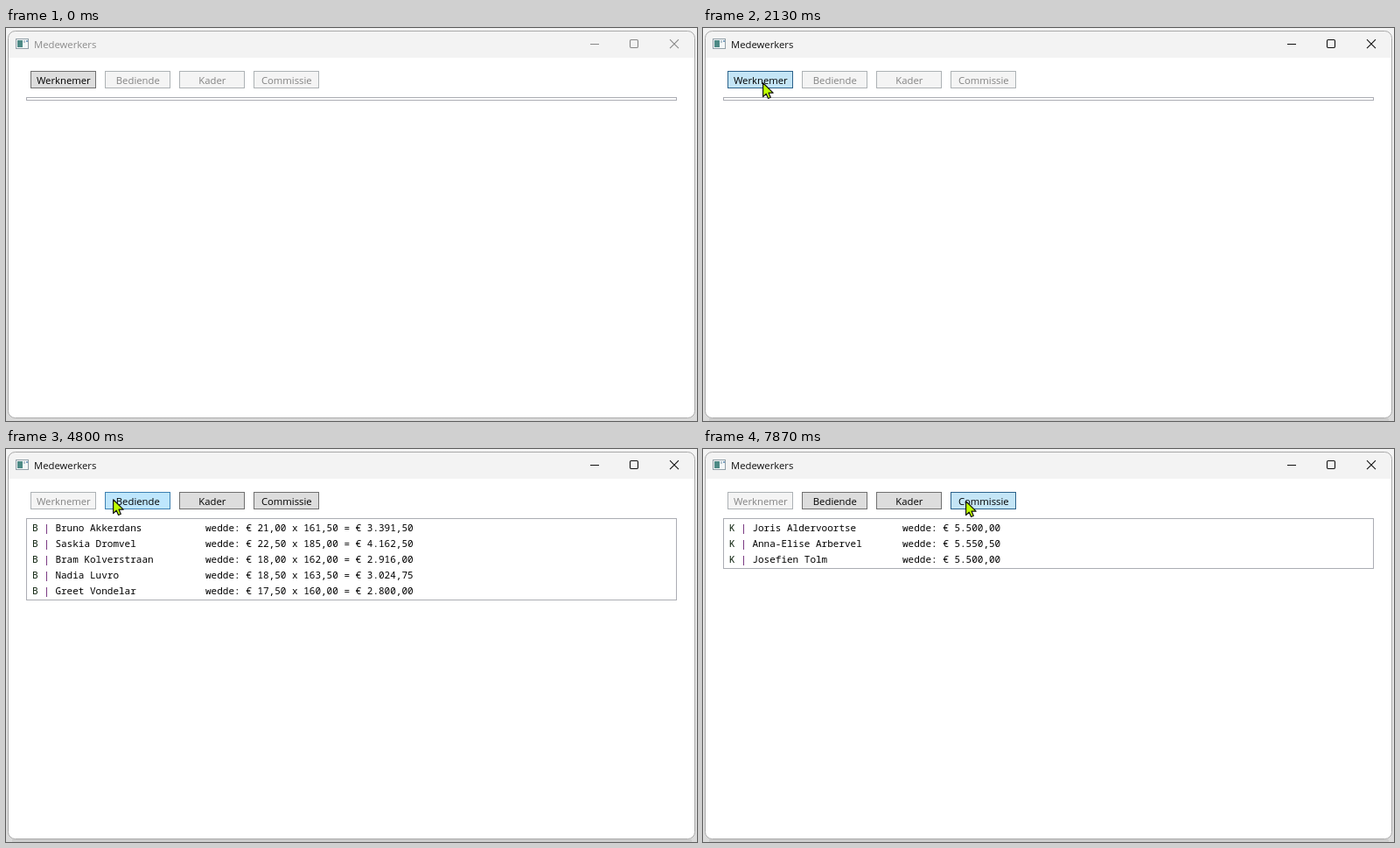
Recreate the animation shown at these times as an HTML page. Size 790 by 449 pixels, loop 8 s.

```html
<!DOCTYPE html>
<html lang="nl">
<head>
<meta charset="utf-8">
<title>Medewerkers</title>
<style>
  html, body { margin: 0; width: 100%; height: 100%; overflow: hidden; background: #fff; }
  svg { display: block; width: 790px; height: 449px; }
  text { font: 11.3px "Open Sans", "Noto Sans", sans-serif; white-space: pre; }
  .list text { font: 11px "Noto Sans Mono", "Liberation Mono", monospace; }
</style>
</head>
<body>
<svg id="stage" viewBox="0 0 790 449">
  <defs>
    <linearGradient id="backdrop" x2="0" y2="1">
      <stop stop-color="#f4f4f4"/>
      <stop offset=".5" stop-color="#e6e6e6"/>
      <stop offset="1" stop-color="#dadada"/>
    </linearGradient>
  </defs>
  <rect width="790" height="449" fill="url(#backdrop)"/>
  <rect id="shadow" x="7" y="446" width="777" height="3" fill="#000" opacity="0"/>
  <rect x="2.5" y="3.5" width="785" height="442" rx="8" fill="#fff"/>
  <path d="M3 34V11a8 8 0 0 1 8-8H779a8 8 0 0 1 8 8V34z" fill="#f3f3f3"/>
  <rect x="2.5" y="3.5" width="785" height="442" rx="8" fill="none" stroke="#a9a9a9"/>
  <g>
    <rect x="11.5" y="12.5" width="14" height="11" fill="#f4f7f8" stroke="#92a0a8"/>
    <rect x="13" y="14" width="6" height="8" fill="#4d8a86"/>
    <rect x="20" y="14" width="2" height="3" fill="#b9c8d0"/>
    <rect x="23" y="14" width="2" height="2" fill="#7fa3c4"/>
  </g>
  <text id="title" x="32" y="23">Medewerkers</text>
  <g id="controls" fill="none" stroke-width="1.1">
    <path d="M668 18.5h10M759 13.2l10 10m0-10l-10 10"/>
    <rect x="713.5" y="13.5" width="9" height="9" rx="1.2"/>
  </g>
  <g id="lists"></g>
  <g id="buttons"></g>
  <path id="cursor" d="M.6.8V16.6L4.2 13.2 6.6 18.5 9.3 17.3 7 12.1H12.2Z"
        fill="#bfff00" stroke="#111" stroke-width="1.2" stroke-linejoin="round"/>
</svg>
<script>
const TICKS = 120, DURATION = 8000;
const $ = id => document.getElementById(id);

function add(parent, tag, attrs, text = '') {
  const el = document.createElementNS('http://www.w3.org/2000/svg', tag);
  for (const key in attrs) el.setAttribute(key, attrs[key]);
  el.textContent = text;
  return parent.appendChild(el);
}

// Loops hard steps; propsAt(tick) gives the style at each 1/15 s tick.
function play(el, propsAt) {
  const frames = [];
  let previous = '';
  for (let tick = 0; tick < TICKS; tick++) {
    const props = propsAt(tick), key = JSON.stringify(props);
    if (key !== previous) {
      const offset = Math.round(tick / 15 * 100) * 10 / DURATION;
      frames.push({ ...props, offset, easing: 'step-end' });
    }
    previous = key;
  }
  frames.push({ ...frames[frames.length - 1], offset: 1 });
  el.animate(frames, { duration: DURATION, iterations: Infinity });
}

// Pointer
const easeOut = power => u => 1 - (1 - u) ** power;
const smooth = u => u * u * (3 - 2 * u);
const moves = [
  // start tick, end tick, end point, easing
  [10, 11, [684, 435], easeOut(1)],
  [11, 22, [80, 75], easeOut(2)],
  [22, 23, [75, 67], easeOut(1)],
  [23, 25, [68, 62], easeOut(1.2)],
  [44, 55, [120, 57], easeOut(1.1)],
  [71, 83, [222, 57], smooth],
  [102, 111, [300, 59], easeOut(1.2)]
];

function pointerAt(tick) {
  let point = [684, 470];
  if (tick < 11) return point;
  for (const [start, end, target, ease] of moves) {
    if (tick <= start) break;
    const p = ease(Math.min(1, (tick - start) / (end - start)));
    point = point.map((v, i) => v + (target[i] - v) * p);
  }
  return point.map(Math.round);
}

play($('cursor'), tick => {
  const [x, y] = pointerAt(tick);
  return { transform: `translate(${x}px, ${y}px)` };
});

// Window activation
play($('title'), tick => ({ fill: tick < 31 ? '#8c8c8c' : '#111' }));
play($('controls'), tick => ({ stroke: tick < 31 ? '#888' : '#111' }));
play($('shadow'), tick => ({ opacity: tick < 32 ? 0 : 0.06 }));

// Buttons
const LOADED = 34;
const looks = {
  normal: ['#dddddd', '#707070', '#000000'],
  hover: ['#bee6fd', '#3c7fb1', '#000000'],
  pressed: ['#c4e5f6', '#2c628b', '#000000'],
  disabled: ['#f4f4f4', '#adb2b5', '#838383']
};
const buttons = [
  // label, press tick, release tick
  ['Werknemer', 31, 34],
  ['Bediende', 61, 63],
  ['Kader', 90, 91],
  ['Commissie', 118, 120]
];

buttons.forEach(([label, press, release], i) => {
  const left = 28 + 85 * i;
  const lookAt = tick => {
    const [x, y] = pointerAt(tick);
    const enabled = (i === 0) === (tick < LOADED);
    const over = x >= left && x < left + 75 && y >= 49 && y < 69;
    if (!enabled) return looks.disabled;
    if (tick >= press && tick < release) return looks.pressed;
    return over ? looks.hover : looks.normal;
  };
  const box = add($('buttons'), 'rect', { x: left + .5, y: 49.5, width: 74, height: 19 });
  const text = add($('buttons'), 'text', { x: left + 37.8, y: 64, 'text-anchor': 'middle' }, label);
  play(box, tick => ({ fill: lookAt(tick)[0], stroke: lookAt(tick)[1] }));
  play(text, tick => ({ fill: lookAt(tick)[2] }));
});

// Lists
const staff = [
  // name, group, pay, hourly sum
  ['Joris Aldervoortse', 'K', '5.500,00'],
  ['Bruno Akkerdans', 'B', '3.391,50', '21,00 x 161,50'],
  ['Anna-Elise Arbervel', 'K', '5.550,50'],
  ['Fien Bolders', '', '4.000,00'],
  ['Toon Corvel', '', '1.625,00'],
  ['Saskia Dromvel', 'B', '4.162,50', '22,50 x 185,00'],
  ['Bram Kolverstraan', 'B', '2.916,00', '18,00 x 162,00'],
  ['Nadia Luvro', 'B', '3.024,75', '18,50 x 163,50'],
  ['Wouter Prams', '', '1.787,50'],
  ['Josefien Tolm', 'K', '5.500,00'],
  ['Greet Vondelar', 'B', '2.800,00', '17,50 x 160,00']
];

function addList(from, to, rows) {
  const list = add($('lists'), 'g', { class: 'list' });
  const height = Math.round(rows.length * 18.05 + 4);
  add(list, 'rect', { x: 23.5, y: 79.5, width: 743, height: height - 1, fill: '#fff', stroke: '#abadb3' });
  rows.forEach((parts, i) => {
    const line = add(list, 'text', { x: 30, y: 94 + 18 * i });
    for (const [text, fill] of parts) add(line, 'tspan', { fill }, text);
  });
  play(list, tick => ({ opacity: tick >= from && tick < to ? 1 : 0 }));
}

const groupRows = group => staff.filter(person => person[1] === group).map(([name, , pay, sum]) => [
  [group + ' ', '#0b200b'],
  ['| ', '#5a0a64'],
  [name.padEnd(26) + 'wedde: € ' + (sum ? sum + ' = € ' : '') + pay, '#000']
]);

addList(0, LOADED, []);
addList(LOADED, 63, staff.map(([name, , pay]) => [[`${name} - € ${pay}`, '#000']]));
addList(63, 91, groupRows('B'));
addList(91, TICKS, groupRows('K'));
</script>
</body>
</html>
```
